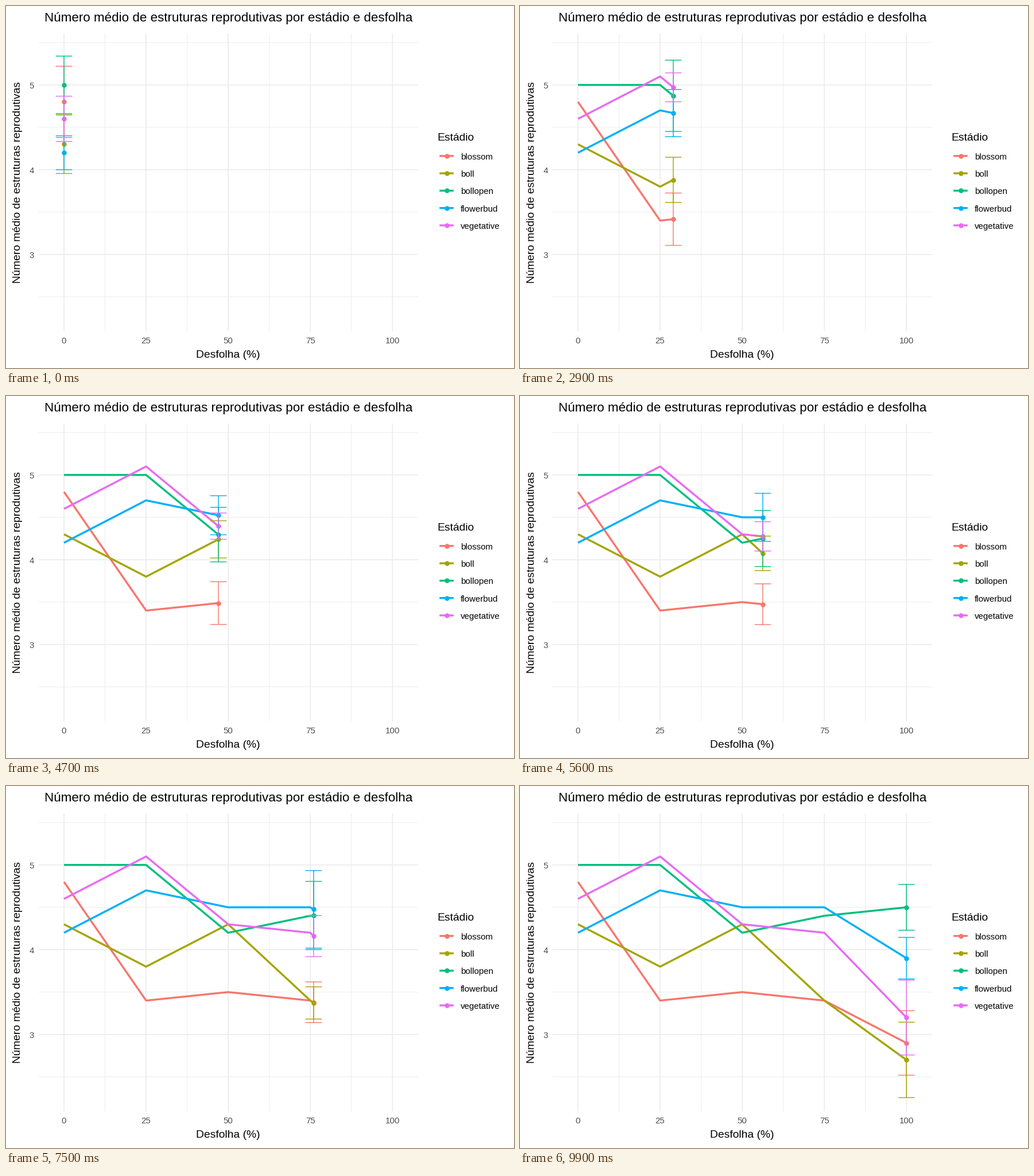
These frames come from a looping animation (885 px wide and 632 px high, 10000 ms). A matplotlib script:

```python
import numpy as np
import matplotlib.pyplot as plt
from matplotlib.animation import FuncAnimation

W, H, DPI = 885, 632, 100
FRAMES, INTERVAL = 100, 100
PX = 72 / DPI  # points per pixel

plt.rcParams["font.family"] = ["Liberation Sans", "DejaVu Sans"]
plt.rcParams["path.snap"] = False

LEFT, RIGHT, TOP, BOTTOM = 56.5, 718, 47.9, 567.9
CAP = 2.5  # half width of an error bar cap, in dose units
LINE_W, BAR_W, DOT = 3.4, 1.42, 8.5

DOSES = np.linspace(0, 100, 5)
KEY_FRAMES = np.floor(DOSES / 100 * (FRAMES - 1) + 0.5)


def wave(t):
    return np.cos(4 * np.pi * t)


# name, colour, mean at each dose, standard error for t = dose / 100
SERIES = [
    ("blossom", "#F8766D", [4.8, 3.4, 3.5, 3.4, 2.9],
     lambda t: 0.42 - 0.4 * t + 0.36 * t**4),
    ("boll", "#A3A500", [4.3, 3.8, 4.3, 3.4, 2.7],
     lambda t: 0.345 - 0.27 * t + 0.37 * t**8),
    ("bollopen", "#00BF7D", [5.0, 5.0, 4.2, 4.4, 4.5],
     lambda t: 0.4 - 0.07 * t - 0.06 * wave(t)),
    ("flowerbud", "#00B0F6", [4.2, 4.7, 4.5, 4.5, 3.9],
     lambda t: 0.2 + 0.2 * t - 0.155 * t * wave(t)),
    ("vegetative", "#E76BF3", [4.6, 5.1, 4.3, 4.2, 3.2],
     lambda t: 0.267 - 0.45 * t + 0.625 * t**2.5),
]


def sx(x):
    return 101.05 + 5.722 * np.asarray(x)


def sy(y):
    return 137.8 + 148 * (5 - np.asarray(y))


fig = plt.figure(figsize=(W / DPI, H / DPI), dpi=DPI, facecolor="white")
ax = fig.add_axes([0, 0, 1, 1])
ax.set_xlim(0, W)
ax.set_ylim(H, 0)
ax.axis("off")


def stroke(xs, ys, color, width, z):
    return ax.plot(xs, ys, color=color, lw=width * PX, zorder=z,
                   solid_capstyle="butt", solid_joinstyle="round")[0]


def dot(x, y, color, z):
    return ax.plot([x], [y], "o", color=color, ms=DOT * PX, mew=0, zorder=z)[0]


def label(x, y, text, size, color="black", ha="left", **kw):
    ax.text(x, y, text, fontsize=size * PX, color=color, ha=ha,
            va="baseline", **kw)


def grid(xs, ys, width, z):
    for y in sy(ys):
        stroke([LEFT, RIGHT], [y, y], "#EBEBEB", width, z)
    for x in sx(xs):
        stroke([x, x], [TOP, BOTTOM], "#EBEBEB", width, z)


grid(DOSES[:-1] + 12.5, np.arange(2.5, 6), 0.9, 0)
grid(DOSES, np.arange(3, 6), 1.6, 1)

# Titles and tick labels
MID = (LEFT + RIGHT) / 2
Y_TITLE = "Número médio de estruturas reprodutivas"
label(MID, 27, Y_TITLE + " por estádio e desfolha", 22.4, ha="center")
label(MID, 614.3, "Desfolha (%)", 19.3, ha="center")
label(24.7, (TOP + BOTTOM) / 2, Y_TITLE, 19.2, ha="center", rotation=90,
      rotation_mode="anchor")
for d in DOSES:
    label(sx(d), 589, f"{d:.0f}", 15, "#4D4D4D", "center")
for v in range(3, 6):
    label(48.8, sy(v) + 6, str(v), 15, "#4D4D4D", "right")

# Legend
label(751.3, 235, "Estádio", 19.3)
for i, (name, color, _, _) in enumerate(SERIES):
    y = 261.8 + 30.3 * i
    stroke([755.2, 779.8], [y, y], color, LINE_W, 2)
    dot(767.5, y, color, 3)
    label(792, y + 6, name, 15)

# Moving layers: lines, then points, then error bars
lines = [stroke([], [], s[1], LINE_W, 4) for s in SERIES]
dots = [dot(0, 0, s[1], 5) for s in SERIES]
bars = [stroke([], [], s[1], BAR_W, 6) for s in SERIES]


def update(frame):
    x = np.interp(frame, KEY_FRAMES, DOSES)
    path = np.append(DOSES[DOSES < x], x)
    a, c, b = sx([x - CAP, x, x + CAP])
    gap = np.nan
    for (_, _, mean, error), line, point, bar in zip(SERIES, lines, dots, bars):
        ys = np.interp(path, DOSES, mean)
        se = np.interp(x, DOSES, error(DOSES / 100))
        hi, mid, lo = sy(ys[-1] + np.array([se, 0, -se]))
        line.set_data(sx(path), sy(ys))
        point.set_data([c], [mid])
        bar.set_data([a, b, gap, c, c, gap, a, b],
                     [hi, hi, gap, hi, lo, gap, lo, lo])
    return lines + dots + bars


anim = FuncAnimation(fig, update, frames=FRAMES, interval=INTERVAL,
                     repeat=True, repeat_delay=0, blit=False)
plt.show()
```
